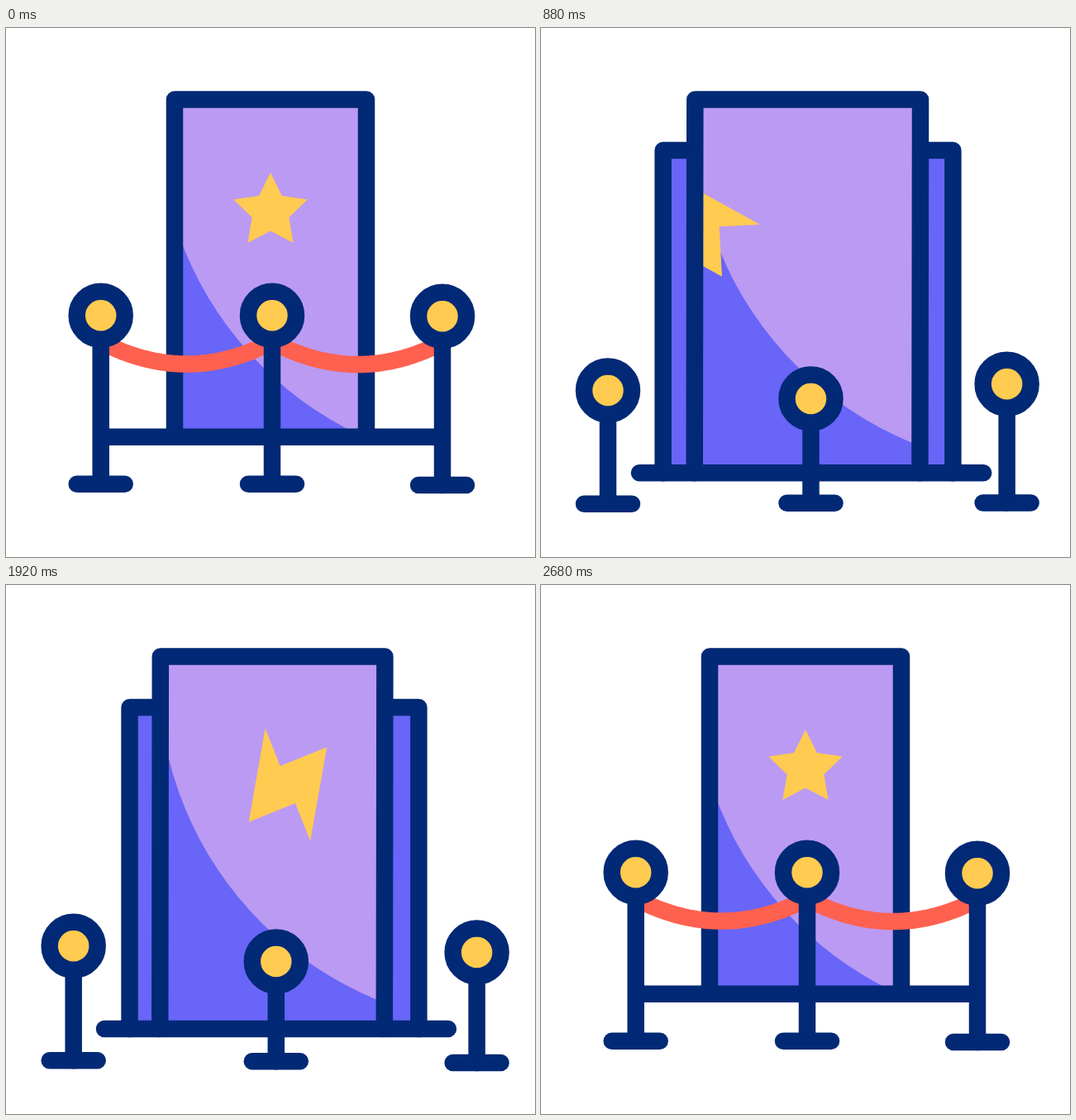
An HTML page with a canvas for the animation above (2800 ms loop, 640 by 640 pixels).

```html
<!DOCTYPE html>
<html lang="en">
<head>
<meta charset="utf-8">
<title>Stage door</title>
<style>
  html, body { margin: 0; width: 100%; height: 100%; overflow: hidden; background: #fff; }
  canvas { display: block; }
</style>
</head>
<body>
<canvas id="stage" width="640" height="640"></canvas>
<script>
const ctx = document.getElementById('stage').getContext('2d');
const LOOP = 2800, LINE = 20.5;
const NAVY = '#022975', LILAC = '#bb9af3', BLUE = '#6865f8', GOLD = '#ffcb50', RED = '#ff6150';

const clamp = v => Math.min(1, Math.max(0, v));
const mix = (a, b, k) => a + (b - a) * k;
const smooth = v => (v = clamp(v), v * v * (3 - 2 * v));

// cubic-bezier(.6, 0, .2, 1)
function ease(v) {
  v = clamp(v);
  let lo = 0, hi = 1;
  for (let i = 0; i < 24; i++) {
    const m = (lo + hi) / 2, n = 1 - m;
    if (1.8 * m * n * n + 0.6 * m * m * n + m * m * m < v) lo = m; else hi = m;
  }
  return lo * lo * (3 - 2 * lo);
}

// 0 -> 1 from `go`, back to 0 from `back`
const swing = (t, go, back, span) => ease((t - go) / span) - ease((t - back) / span);

function line(points, color = NAVY, fill) {
  ctx.beginPath();
  points.forEach(p => ctx.lineTo(...p));
  if (fill) { ctx.fillStyle = fill; ctx.fill(); }
  ctx.strokeStyle = color;
  ctx.stroke();
}

function shape(points) {
  ctx.beginPath();
  points.forEach(p => ctx.lineTo(...p));
  ctx.fillStyle = GOLD;
  ctx.fill();
}

const star = Array.from({ length: 10 }, (_, i) => {
  const r = i % 2 ? 23.5 : 47, a = i * Math.PI / 5 - Math.PI / 2;
  return [r * Math.cos(a), r * Math.sin(a)];
});
const bolt = [[1, -73.5], [0.2, -24.3], [61, -23.7], [-1, 73.5], [-0.2, 24.3], [-61, 23.7]];

function symbol(points, x, y, entering, leaving, spin) {
  ctx.save();
  ctx.translate(x + 240 * (leaving - 1 + entering), y);
  ctx.rotate((160 * (1 - entering) - spin * leaving) * Math.PI / 180);
  shape(points);
  ctx.restore();
}

function door(t) {
  const open = swing(t, 240, 1800, 720);
  const floor = mix(494.7, 538.6, open);
  const left = mix(204, 186.2, open), right = mix(436, 459.2, open), skew = 0.6 * open;
  const top = 86.5;

  const wingL = mix(208.5, 146.6, swing(t, 280, 1784, 720));
  const wingR = mix(433, 500.6, swing(t, 320, 1830, 720));
  line([[wingL, floor], [wingL, 148], [320, 148], [320, floor]], NAVY, BLUE);
  line([[wingR, floor], [wingR, 148], [320, 148], [320, floor]], NAVY, BLUE);

  const frame = [[left - skew, floor], [left, top], [right, top], [right - skew, floor]];
  ctx.save();
  ctx.beginPath();
  frame.forEach(p => ctx.lineTo(...p));
  ctx.clip();
  ctx.fillStyle = BLUE;
  ctx.fillRect(0, 0, 640, 640);
  ctx.beginPath();
  ctx.arc(610.4, 107.6, 426, 0, 7);
  ctx.fillStyle = LILAC;
  ctx.fill();

  const starBack = t > 1360;
  symbol(star, 320, 222, starBack ? ease((t - 1840) / 680) : 1,
    starBack ? 0 : ease((t - 520) / 680), 300);
  symbol(bolt, 321, 241.5, ease((t - 600) / 680), ease((t - 1760) / 680), 272);
  ctx.restore();

  line(frame);
  line([[119, floor], [mix(523, 535.3, open), floor]]);
}

// Part of the hanging curve between two posts, from share a to share b
function rope(p, q, a, b) {
  if (b <= a) return;
  const points = [];
  for (let i = 0; i <= 40; i++) {
    const k = mix(a, b, i / 40);
    points.push([mix(p.x, q.x, k), mix(p.y, q.y, k) + 31.8 + 108 * k * (1 - k)]);
  }
  line(points, RED);
}

function post({ x, y, base }) {
  line([[x, y + 29], [x, base]]);
  line([[x - 29, base], [x + 29, base]]);
  ctx.beginPath();
  ctx.arc(x, y, 29, 0, 7);
  ctx.fillStyle = GOLD;
  ctx.fill();
  ctx.stroke();
}

// Resting and lowered [x, ball y, base y]
const posts = [
  [[114.7, 347.7, 551.7], [78.7, 444.8, 577.4]],
  [[322, 347.8, 551.7], [327, 460, 577.4]],
  [[528, 348.7, 553], [570.3, 446, 578.5]]
];

function draw(t) {
  ctx.fillStyle = '#fff';
  ctx.fillRect(0, 0, 640, 640);
  ctx.lineWidth = LINE;
  ctx.lineCap = ctx.lineJoin = 'round';
  door(t);

  const placed = posts.map(([rest, low], i) => {
    const k = swing(t, 400 + 40 * i, 1760 + 40 * i, 680);
    const [x, y, base] = rest.map((v, j) => mix(v, low[j], k));
    return { x, y, base };
  });
  const back = t > 1360;
  const from = back ? 0 : 2 * smooth(t / 660);
  const to = back ? 2 * smooth((t - 2000) / 680) : 2;
  for (const i of [0, 1]) rope(placed[i], placed[i + 1], clamp(from - i), clamp(to - i));
  placed.forEach(post);
}

function tick() {
  draw(performance.now() % LOOP);
  requestAnimationFrame(tick);
}
tick();
</script>
</body>
</html>
```
